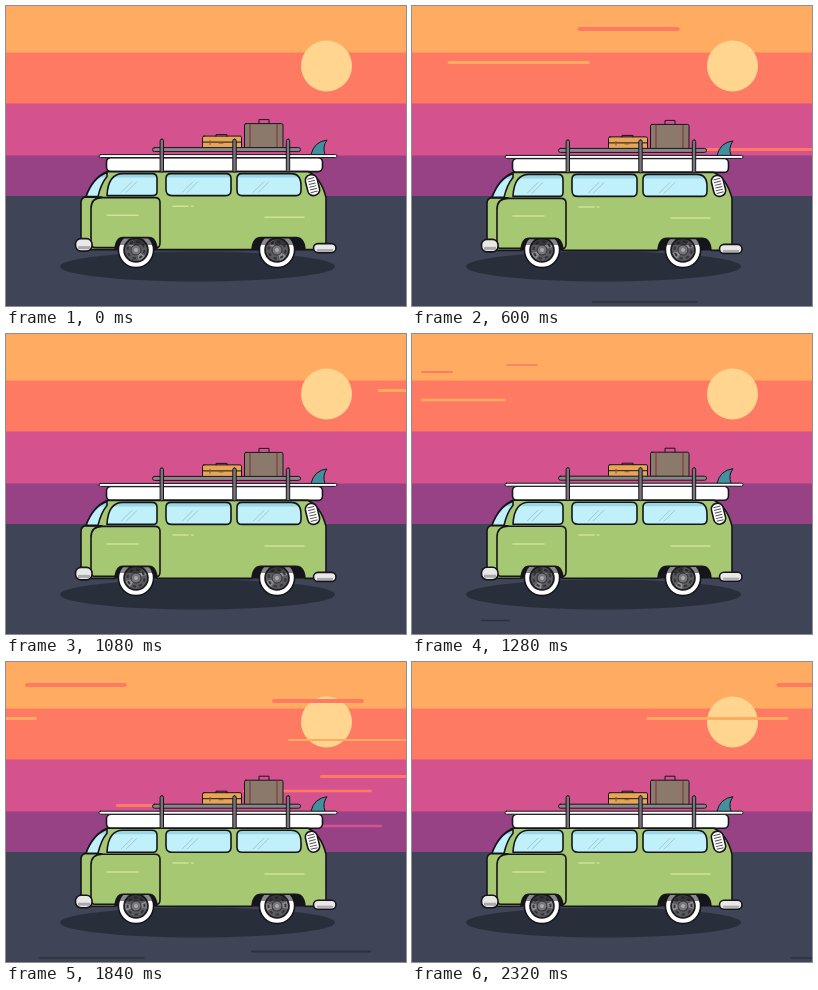
An HTML page that plays this animation: 400x300 px, repeating every 2.36 s.

```html
<!DOCTYPE html>
<html>
<head>
<meta charset="utf-8">
<style>
html, body { margin: 0; height: 100%; overflow: hidden; }
svg { display: block; width: 400px; height: 300px; }
.ink { stroke: #15151b; stroke-width: 1.6; stroke-linejoin: round; stroke-linecap: round; }
.thin { stroke-width: 1; }
.line { fill: none; }
</style>
</head>
<body>
<svg viewBox="0 0 400 300">
  <defs>
    <g id="wheel">
      <circle r="17.600" fill="#fff" class="ink"/>
      <circle r="12.800" fill="#1d1c22"/>
      <g class="spin">
        <circle r="11" fill="#5b5a5e"/>
        <path d="M0 0L-9 -6A11 11 0 0 1 -3 -10.500ZM0 0L9 6A11 11 0 0 1 3 10.500Z" fill="#8f8e91"/>
        <circle r="8.500" fill="none" stroke="#343338" stroke-width="2" stroke-dasharray="3.4 3.28"/>
        <circle r="5" fill="#77767a" stroke="#343338"/>
        <circle r="2" fill="#a9a8aa"/>
      </g>
    </g>
    <rect id="post" x="-1.700" y="133.500" width="3.400" height="33" rx="1.700" fill="#7b757c" class="ink thin"/>
    <path id="slashes" d="M0 187l11-11M5 187l11-11" stroke="#a3c6d2"/>
    <path id="arches" d="M109 244.500Q110 232 117 232H143Q150 232 151 244.500ZM246 244.500Q247 232 255 232H290Q298 232 299 244.500Z"/>
    <path id="pane-shapes" d="M80 191Q87 172 101 167V171Q95 178 92 191Z
      M101 190Q102 168 117 168H146Q151 168 151 173V186Q151 190 147 190Z
      M165 168H220Q225 168 225 173V185Q225 190 220 190H166Q160 190 160 184V173Q160 168 165 168Z
      M236 168H285Q295 168 295 180V185Q295 190 290 190H236Q231 190 231 185V173Q231 168 236 168Z"/>
    <clipPath id="panes"><use href="#pane-shapes"/></clipPath>
  </defs>

  <rect width="400" height="300" fill="#ffab61"/>
  <rect y="46.500" width="400" height="254" fill="#ff7a63"/>
  <rect y="97.500" width="400" height="203" fill="#d4528e"/>
  <rect y="149.500" width="400" height="151" fill="#964284"/>
  <rect y="190" width="400" height="110" fill="#3f4457"/>
  <circle cx="320.500" cy="60" r="25.500" fill="#ffd590"/>
  <g id="streaks"></g>
  <ellipse cx="191.500" cy="260.500" rx="137.500" ry="15" fill="#282e3a"/>

  <use href="#arches" fill="#15151b"/>
  <use href="#wheel" x="130" y="244"/>
  <use href="#wheel" x="271" y="244"/>
  <path d="M110 225H150V239H110ZM248 225H298V239H248Z" fill="#15151b" opacity="0.5"/>

  <g id="van">
    <path d="M305 149Q308 136 321 134.500Q316 141 319 149Z" fill="#42909d" class="ink thin"/>
    <g class="ink thin">
      <rect x="196.500" y="130.500" width="39" height="12.500" rx="1.500" fill="#e6a656"/>
      <path d="M197 136.500H235M210 130.500V129H221V130.500" class="line"/>
      <path d="M204 135v4M228 135v4M213 137.500h4" stroke="#8a5527"/>
      <path d="M253 118V114H263V118" class="line"/>
      <rect x="238.500" y="118" width="38.500" height="25" rx="1.500" fill="#8b796c"/>
      <path d="M244 118.500V142M271 118.500V142" stroke="#7d2f35"/>
    </g>
    <rect x="146.500" y="142" width="148" height="4" rx="2" fill="#8b868a" class="ink thin"/>
    <rect x="100.500" y="152" width="216" height="14" rx="4.500" fill="#fff" class="ink"/>
    <rect x="93" y="149" width="238" height="3" rx="1.500" fill="#fff" class="ink thin"/>
    <path d="M101 166H302Q315 172 320 192V244H299Q298 232 290 232H255Q247 232 246 244H151Q150 232 143 232H117Q110 232 109 244H75V197Q75 192 80 191Q87 172 101 166Z" fill="#a7c872" class="ink"/>
    <path d="M109 242H89Q85 242 85 237V203Q85 192 96 192H149Q154 192 154 197V237Q154 242 151 242M80 191.500H96" class="ink line"/>
    <use href="#pane-shapes" fill="#c0f0fa"/>
    <g clip-path="url(#panes)">
      <path d="M78 166H298V172H78Z" fill="#9ad6e4"/>
      <use href="#slashes" x="115"/>
      <use href="#slashes" x="176"/>
      <use href="#slashes" x="247"/>
    </g>
    <use href="#pane-shapes" class="ink line"/>
    <g transform="translate(306.500 179.500) rotate(-14)">
      <rect x="-6" y="-10.500" width="12" height="21" rx="5.500" fill="#fff" class="ink"/>
      <path d="M-3.500 -7h7m-7 2.800h7m-7 2.800h7m-7 2.800h7m-7 2.800h7m-7 2.800h7" stroke="#55535a"/>
    </g>
    <path d="M101 209.700H132M167 200.700H182M185.500 200.700H187M259 211.700H298" stroke="#cfe39a" stroke-width="1.500" stroke-linecap="round"/>
    <use href="#post" x="155.800"/>
    <use href="#post" x="228.500"/>
    <use href="#post" x="282"/>
    <rect x="69.500" y="233" width="16.500" height="12.500" rx="5.500" fill="#e8e8e8" class="ink"/>
    <path d="M72 242H84" stroke="#a9a9ae" stroke-width="3"/>
    <rect x="307.500" y="238" width="22.500" height="9" rx="4.500" fill="#e8e8e8" class="ink"/>
    <path d="M311 244.500H327" stroke="#a9a9ae" stroke-width="2"/>
  </g>
</svg>
<script>
const LOOP = 2360, STEP = 40, REPEAT = 1440;
const orange = '#ffab61', red = '#ff7a63', pink = '#d4528e', dark = '#2d313f';

// Each streak: x at the group's reference time, y, length, thickness, colour.
const groups = [
  {
    shift: t => {
      const u = t % REPEAT - 320;
      // The tail of the cycle is the run-up to the next pass.
      const v = u > 800 ? u - REPEAT : u;
      return 0.752 * v - 0.00005 * v * v;
    },
    streaks: [[-41, 23, 102, 4, red], [-171, 56.5, 142, 3, orange],
      [50, 143.5, 148, 3, red], [-27, 296, 106, 1.5, dark]]
  },
  {
    shift: t => (t - 1280) * 0.784,
    streaks: [[94, 31, 32, 1.5, red], [9, 38, 32, 2, red], [9, 66, 85, 2.5, orange],
      [91, 209, 44, 1.5, dark], [69, 286.5, 29, 1.3, dark]]
  },
  {
    shift: t => (t - 1600) * 0.808,
    streaks: [[72, 39, 92, 4, red], [88, 78, 152, 2, orange], [120, 114.5, 100, 3, red],
      [43, 129, 129, 2.5, red], [54, 164, 128, 2.5, pink], [51, 289.5, 120, 2, dark]]
  }
];

const layer = document.getElementById('streaks');
const van = document.getElementById('van');
const spinners = document.querySelectorAll('.spin');
// Spin the shared wheel shape; both uses follow it.

for (const group of groups) {
  group.node = document.createElementNS('http://www.w3.org/2000/svg', 'g');
  group.node.innerHTML = group.streaks.map(([x, y, length, weight, color]) =>
    `<rect x="${x}" y="${y - weight / 2}" width="${length}" height="${weight}" rx="${weight / 2}" fill="${color}"/>`
  ).join('');
  layer.append(group.node);
}

function draw(now) {
  const t = Math.floor(now % LOOP / STEP) * STEP;
  for (const { node, shift } of groups) node.setAttribute('transform', `translate(${shift(t)})`);
  const bob = -0.4 * Math.cos(t / 240 * 2 * Math.PI);
  van.setAttribute('transform', `translate(0 ${bob})`);
  for (const spinner of spinners) spinner.setAttribute('transform', `rotate(${t * 0.75})`);
  requestAnimationFrame(() => draw(performance.now()));
}
draw(0);
</script>
</body>
</html>
```
